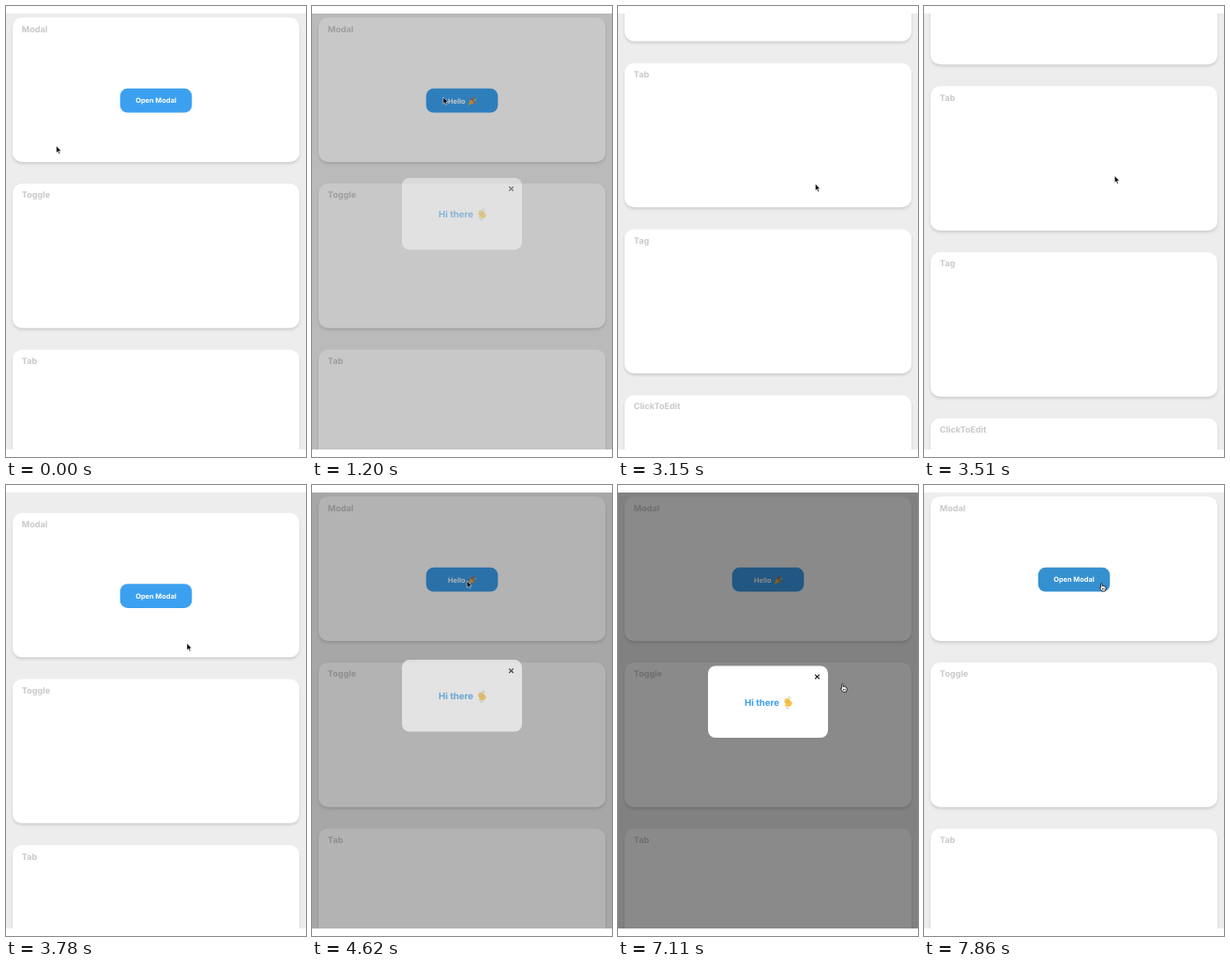
Recreate the animation shown at these times as an HTML page. Size 320 px wide and 480 px high, loop 8 s.

```html
<!DOCTYPE html>
<html lang="en">
<head>
<meta charset="utf-8">
<title>UI components</title>
<style>
  html, body { margin: 0; width: 100%; height: 100%; overflow: hidden; background: #fff; }
  svg { display: block; width: 320px; height: 480px; }
  text { font-family: Inter, "Open Sans", sans-serif; font-weight: 700; text-rendering: geometricPrecision; }
  .title { font-size: 9.1px; fill: #c9c9c9; }
  .label { font-size: 7.4px; fill: #fff; }
  .greet { font-size: 9.7px; fill: #3b9fe8; }
  .card { fill: #fff; filter: drop-shadow(0 2px 1.5px rgba(0, 0, 0, .13)); }
</style>
</head>
<body>
<svg viewBox="0 0 320 480">
  <clipPath id="view"><rect y="8" width="320" height="464"/></clipPath>
  <g clip-path="url(#view)">
    <rect y="8" width="320" height="464" fill="#ededed"/>
    <g id="page">
      <g id="cards"></g>
      <rect id="button" x="121.7" y="87.8" width="76.6" height="25.7" rx="8"/>
      <text id="idle" class="label" x="160" y="103.4" text-anchor="middle">Open Modal</text>
      <g id="opened">
        <text class="label" x="145" y="103.6">Hello</text>
        <g transform="translate(166.3 96.3)" fill="none" stroke-width="1">
          <path d="M.3 9.4 2.8 2.8Q6 3.6 6.8 6.6Z" fill="#f2a93b"/>
          <path d="M2.8 2.8Q6 3.6 6.8 6.6" stroke="#9c5f2a"/>
          <path d="M5 3.8Q5.8 2.5 4.8.6" stroke="#e2574c"/>
          <path d="M6 4.6Q7.2 3.2 9 3.6" stroke="#f7c948"/>
          <path d="M7.2 6.4 9 7.4M6.8 2.2 8.4.6M1.6 1h1" stroke="#d8853c"/>
        </g>
      </g>
    </g>
    <rect id="overlay" y="8" width="320" height="464"/>
    <g id="dialog">
      <rect x="96" y="192.5" width="128" height="76.5" rx="8" fill="#fff"/>
      <path id="close" d="M210.2 201.8l4.6 4.6m0-4.6l-4.6 4.6" stroke-width="1.2"/>
      <text class="greet" x="135" y="234.8">Hi there</text>
      <g transform="translate(181.4 231.6) rotate(-38)" fill="none" stroke-linecap="round">
        <path d="M-2.2 0V-3.2M-.6 0V-4.5M1 0V-4.6M2.6.4V-3.4M-2.2 2.6-4.2.4" stroke="#f6c244" stroke-width="1.3"/>
        <rect x="-2.8" y="-.8" width="6" height="5" rx="2" fill="#f6c244"/>
        <path d="M-1.4-.2V-2.6M.2-.2V-3.2M1.8-.1V-2.8" stroke="#c98a22" stroke-width=".4"/>
        <path d="M4.4-4.4Q5.6-3.2 5.2-1.6M-5 2.8Q-4.6 4.4-3.2 5" stroke="#8fa9b8" stroke-width=".6"/>
      </g>
    </g>
    <g id="cursor">
      <path id="arrow" d="M0 0V7.2L1.7 5.7 2.8 8.4 4 7.9 2.9 5.3H5.1Z" stroke="#fff" stroke-width=".5"/>
      <path id="hand" d="M1.6 5.2V.9Q2.3-.2 3 .9V3.3L4.4 3.4 6 3.9 7 4.6V6.6L6.3 9H2.8L.3 5.4Q.6 4.3 1.6 5.2ZM3.5 5.6V7.4M5 5.6V7.4" fill="#fff" stroke="#000" stroke-width=".75" stroke-linejoin="round"/>
    </g>
  </g>
</svg>
<script>
const LOOP = 8000, FADE = 300;
const el = id => document.getElementById(id);
const set = (id, name, value) => el(id).setAttribute(name, value);
const show = (id, on) => set(id, 'visibility', on ? 'visible' : 'hidden');
const move = (id, x, y) => set(id, 'transform', `translate(${x.toFixed(2)} ${y.toFixed(2)})`);

el('cards').innerHTML = ['Modal', 'Toggle', 'Tab', 'Tag', 'ClickToEdit'].map((name, i) =>
  `<g transform="translate(0 ${i * 176.75})">
    <rect class="card" x="7" y="12.3" width="306" height="153.6" rx="10"/>
    <text class="title" x="16.8" y="27.6">${name}</text>
  </g>`).join('');

const clamp = u => Math.min(1, Math.max(0, u));
const smooth = u => (u = clamp(u), u * u * (3 - 2 * u));
const easeOut = u => 1 - (1 - clamp(u)) ** 2;

// Pointer moves: where each one ends, and how far its path sags
const moves = [
  { from: 60, to: 540, x: 190, y: 102 },
  { from: 870, to: 960, x: 140, y: 97 },
  { from: 1680, to: 2130, x: 211, y: 205, sag: 65 },
  { from: 2430, to: 2820, x: 210.5, y: 189.3 },
  { from: 3300, to: 3780, x: 193, y: 168.5 },
  { from: 3810, to: 4290, x: 190, y: 103 },
  { from: 4470, to: 4770, x: 141, y: 101 },
  { from: 5250, to: 5520, x: 243, y: 226 },
  { from: 5670, to: 6060, x: 204, y: 211, sag: -66 },
  { from: 6060, to: 6390, x: 158, y: 224 },
  { from: 6720, to: 7200, x: 245, y: 210 },
  { from: 7470, to: 7860, x: 187, y: 104 }
];
const visits = [[1120, 2430], [4500, 7475]];

function pointer(t) {
  let x = 53.7, y = 149;
  for (const m of moves) {
    const u = smooth((t - m.from) / (m.to - m.from));
    x += (m.x - x) * u;
    y += (m.y - y) * u + (m.sag || 0) * 4 * u * (1 - u);
  }
  return [x, y];
}

// Flick down, flick back past the top, then settle
const scroll = t => 422.5 * smooth((t - 3360) / 420)
  - 405 * easeOut((t - 3000) / 300)
  - 17.5 * easeOut((t - 3780) / 400);

function draw(t) {
  const [x, y] = pointer(t), top = scroll(t);
  const open = visits.some(([from, to]) => t >= from && t < to);
  const shown = visits.reduce((sum, [from, to]) =>
    sum + easeOut((t - from) / FADE) - easeOut((t - to) / FADE), 0);
  const onButton = !open && x > 122 && x < 198 && y > 88 + top && y < 113 + top;
  const onClose = open && Math.abs(x - 212) < 4 && Math.abs(y - 204) < 4;
  const hand = onButton || open && shown > .99;

  move('page', 0, top);
  set('button', 'fill', onButton ? '#3590d0' : '#3ca0f0');
  show('idle', !open);
  show('opened', open);
  set('overlay', 'opacity', .46 * shown);
  set('dialog', 'opacity', shown);
  move('dialog', 0, -18 * (1 - shown));
  set('close', 'stroke', onClose ? '#2f86c8' : '#111');
  move('cursor', x, y);
  show('hand', hand);
  show('arrow', !hand);
}

const start = performance.now();
function tick() {
  draw((performance.now() - start) % LOOP);
  requestAnimationFrame(tick);
}
tick();
</script>
</body>
</html>
```
